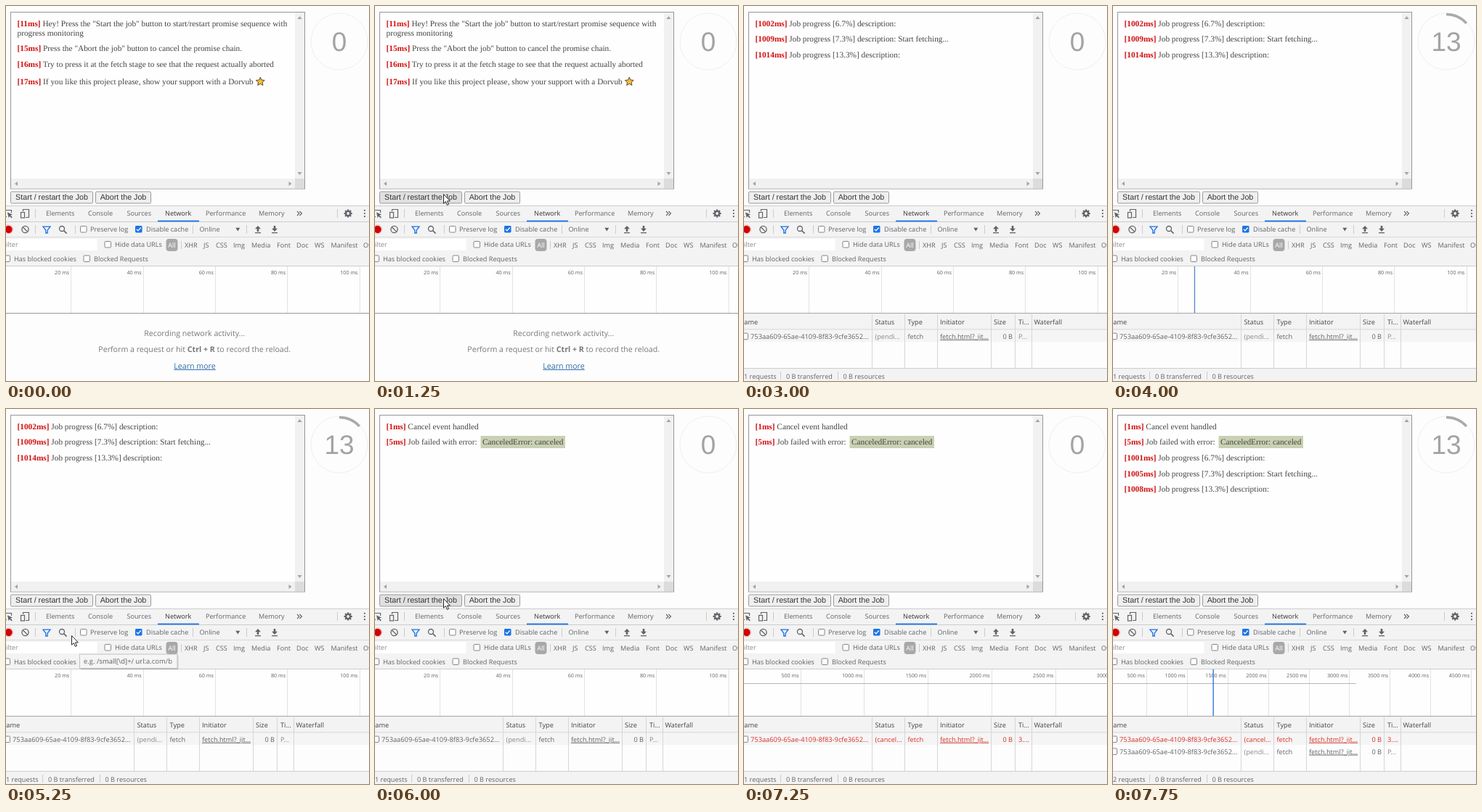
Recreate the animation shown at these times as an HTML page. Size 500 by 517 pixels, loop 8000 ms.

```html
<!DOCTYPE html>
<html lang="en">
<head>
<meta charset="utf-8">
<title>Promise job monitor</title>
<style>
  html, body { margin: 0; width: 100%; height: 100%; overflow: hidden; background: #fdfdfd; }
  svg { display: block; width: 100vw; height: 100vh; }
  text { font: 9.15px 'Open Sans', 'Noto Sans', sans-serif; fill: #5f6368; text-rendering: geometricPrecision; }
  .log text { font: 11.32px 'Liberation Serif', 'Times New Roman', serif; fill: #444; }
  .log .at { font-weight: 700; fill: #d01010; }
  .btn text { font: 10.7px 'Liberation Sans', Arial, sans-serif; fill: #333; text-anchor: middle; }
  .num { font: 37px 'Liberation Sans', Arial, sans-serif; fill: #a3a3a3; text-anchor: middle; }
  .tick { font-size: 7.2px; text-anchor: end; }
  .hint { font-size: 10.65px; fill: #777; text-anchor: middle; }
  .cell { font-size: 9.2px; }
  .tip { font-size: 9.45px; fill: #575757; }
  .end { text-anchor: end; }
</style>
</head>
<body>
<svg viewBox="0 0 500 517" preserveAspectRatio="none">
  <g id="base"></g>
  <g id="live"></g>
</svg>
<script>
const STEP = 250, LOOP = 8000;
const INK = '#5f6368', BLUE = '#1a73e8', RED = '#d93025';

const rect = (x, y, w, h, fill, extra = '') =>
  `<rect x="${x}" y="${y}" width="${w}" height="${h}" fill="${fill}" ${extra}/>`;
const path = (d, stroke, width = 1, fill = 'none') =>
  `<path d="${d}" stroke="${stroke}" stroke-width="${width}" fill="${fill}"/>`;
const shape = (d, fill) => `<path d="${d}" fill="${fill}"/>`;
const text = (x, y, s, cls = '', extra = '') =>
  `<text x="${x}" y="${y}" class="${cls}" ${extra}>${s}</text>`;
const circle = (x, y, r, stroke, width, fill = 'none') =>
  `<circle cx="${x}" cy="${y}" r="${r}" stroke="${stroke}" stroke-width="${width}" fill="${fill}"/>`;
const hline = (y, c) => rect(0, y, 500, 1, c);
const vline = (x, y, h, c = '#ccc') => rect(x, y, 1, h, c);
const box = (x, y) => rect(x + .5, y + .5, 8.5, 8.5, '#fff', 'rx="1.2" stroke="#858585"');

function logFrame() {
  return rect(6.5, 8.5, 405, 243.5, '#fefefe', 'stroke="#979797"')
    + rect(398, 9, 13, 229, '#f1f1f1') + rect(7, 238, 391, 13.5, '#f1f1f1')
    + rect(398, 238, 13, 13.5, '#dcdcdc')
    + shape('M401.5 18l3-4 3 4zM401.5 229l3 4 3-4zM16 242l-4 3 4 3zM389.5 242l4 3-4 3z', '#a3a3a3');
}

function icons() {
  const teeth = Array.from({ length: 8 }, (_, i) =>
    `<rect x="470.1" y="280.4" width="2.2" height="3" fill="${INK}" transform="rotate(${i * 45} 471.2 286)"/>`).join('');
  return path('M-2 281.5H7.5V285M-2 290.5H1', INK, 1.2)
    + shape('M2 284.5l7 3-2.8 1 2.6 2.8-1.2 1.1-2.6-2.7-1.3 2.6z', INK)
    + path('M23.5 283V280.5H31.5V291.5H27', INK, 1.2) + rect(20.5, 284.5, 5, 7.5, '#f3f3f3', `stroke="${INK}" stroke-width="1.2"`)
    + path('M401 283l3 3-3 3M404.5 283l3 3-3 3', INK, 1.1)
    + teeth + circle(471.2, 286, 3, INK, 2.2)
    + [281.8, 286, 290.2].map(y => circle(494, y, 1.1, 'none', 0, INK)).join('')
    + circle(3.5, 308, 5.2, 'none', 0, '#d40000') + circle(3.5, 308, 6.2, '#f0a0a0', .6)
    + circle(26.5, 308, 4.6, INK, 1.3) + path('M23.2 304.8l6.6 6.6', INK, 1.3)
    + path('M51 304.2h10l-3.8 4.8v4h-2.4v-4z', BLUE, 1.3)
    + circle(77, 307, 3.5, INK, 1.3) + path('M79.6 309.6l4 4', INK, 1.5)
    + shape('M316.3 305.8h6l-3 4.6z', INK)
    + shape('M347 303l4 4.2h-2.7v3.8h-2.6v-3.8H343zM370 311l-4-4.2h2.7V303h2.6v3.8h2.7z', INK)
    + rect(343, 312, 8, 1.3, INK) + rect(366, 312, 8, 1.3, INK);
}

function devtools() {
  const tabs = [[55, 'Elements'], [113, 'Console'], [166.5, 'Sources'], [275, 'Performance'], [348, 'Memory']];
  const kinds = [[246, 'XHR'], [272, 'JS'], [289, 'CSS'], [313, 'Img'], [338, 'Media'], [373, 'Font'],
    [400, 'Doc'], [425, 'WS'], [447.5, 'Manifest'], [492, 'Other']];
  return rect(0, 275, 500, 84, '#f3f3f3') + hline(275, '#cdcdcd') + hline(297, '#cdcdcd') + hline(318, '#dadada')
    + tabs.map(([x, s]) => text(x, 289.4, s)).join('')
    + text(219, 289.4, 'Network', '', 'style="fill:#333"') + rect(209, 295.6, 57, 1.8, BLUE)
    + vline(40, 280, 12) + vline(456, 280, 12)
    + [40, 95, 257, 331].map(x => vline(x, 302, 12)).join('')
    + icons()
    + box(102, 303) + text(116, 311.3, 'Preserve log')
    + rect(178, 303, 9.5, 9.5, BLUE, 'rx="1.4"') + path('M179.9 307.8l2 2.1 3.8-4.4', '#fff', 1.3)
    + text(193, 311.3, 'Disable cache') + text(266.5, 311.3, 'Online')
    + rect(0, 321, 125.5, 16, '#fff') + text(-4.7, 332.2, 'Filter', '', 'style="fill:#8a8a8a"')
    + box(135.5, 324) + text(150, 332.2, 'Hide data URLs')
    + rect(220.5, 321, 16, 17, '#a8a8a8', 'rx="4"') + text(223.2, 333, 'All', '', 'style="fill:#fff"')
    + vline(241, 324, 11)
    + kinds.map(([x, s]) => text(x, 333, s)).join('')
    + box(-3.5, 343.5) + text(11, 351.8, 'Has blocked cookies')
    + box(106.5, 343.5) + text(121, 351.8, 'Blocked Requests');
}

const LOGS = {
  intro: [
    [27.5, '11', 'Hey! Press the "Start the job" button to start/restart promise sequence with'],
    [41.3, '', 'progress monitoring'],
    [62.3, '15', 'Press the "Abort the job" button to cancel the promise chain.'],
    [84.3, '16', 'Try to press it at the fetch stage to see that the request actually aborted'],
    [107.7, '17', 'If you like this project please, show your support with a Dorvub']],
  cancel: [[27.5, '1', 'Cancel event handled'], [49.2, '5', 'Job failed with error:']]
};
const progress = (y, times) =>
  ['[6.7%] description:', '[7.3%] description: Start fetching...', '[13.3%] description:']
    .map((s, i) => [y + i * 21.7, times[i], 'Job progress ' + s]);

const line = ([y, ms, s]) =>
  text(15.5, y, (ms && `<tspan class="at">[${ms}ms]</tspan> `) + s);

function star(cx, cy) {
  const pts = Array.from({ length: 10 }, (_, i) => {
    const r = i % 2 ? 2.9 : 6.2, a = i * Math.PI / 5;
    return (cx + r * Math.sin(a)).toFixed(1) + ',' + (cy - r * Math.cos(a)).toFixed(1);
  });
  return `<polygon points="${pts.join(' ')}" fill="#f7bf3a" stroke="#4a3b20" stroke-width=".9" stroke-linejoin="round"/>`;
}

function log(n) {
  let lines = [], extra = '';
  if (n < 8) {
    lines = LOGS.intro;
    extra = star(350.3, 104.3);
  } else if (n >= 24) {
    lines = LOGS.cancel.concat(n >= 30 ? progress(70.9, [1001, 1005, 1008]) : []);
    extra = rect(145.5, 37, 116.5, 17, '#c9d1b3') + text(148, 49.2, 'CanceledError: canceled');
  } else if (n >= 12) {
    lines = progress(27.5, [1002, 1009, 1014]);
  }
  return `<g class="log">${lines.map(line).join('')}${extra}</g>`;
}

function dial(n) {
  const rise = [0, 7, 11, 13.3];
  const v = n >= 30 ? (n === 30 ? 7 : 13.3) : n >= 12 && n < 24 ? rise[Math.min(n - 12, 3)] : 0;
  const a = v / 50 * Math.PI, r = 37.5;
  const arc = v ? path(`M459 ${49 - r}A${r} ${r} 0 0 1 ${459 + r * Math.sin(a)} ${49 - r * Math.cos(a)}`, '#aaa', 3.4) : '';
  return circle(459, 49, 39, '#efefef', 1) + arc + text(459, 62.2, Math.floor(v), 'num');
}

function buttons(n) {
  const hot = n >= 5 && n <= 8 || n === 23 || n === 24;
  const one = (x, w, s, fill) =>
    rect(x + .5, 256, w, 16, fill, 'rx="1.6" stroke="#999"') + text(x + .5 + w / 2, 267.2, s);
  return `<g class="btn">${one(6, 113, 'Start / restart the Job', hot ? '#e0e0e0' : '#efefef')}`
    + `${one(123, 76, 'Abort the Job', '#efefef')}</g>`;
}

function timeline(n) {
  const [gap, unit] = n < 25 ? [99.3, 20] : n < 30 ? [87.7, 500] : [55.9, 500];
  let s = rect(0, 359, 500, 65, '#fefefe') + hline(358, '#cdcdcd');
  for (let i = 1, x; (x = i * gap - 10) < 530; i++)
    s += vline(Math.round(x), 359, 64, '#e2e2e2') + text(x - 2, 370.3, i * unit + ' ms', 'tick');
  if (n >= 25) s += rect(0, 378, n < 30 ? 500 : 335, 1, '#b5b5b5');
  if (n >= 14 && n < 18) s += rect(111.8, 359, 1.3, 64, '#5b7fd0');
  if (n >= 31) s += rect(137.4, 359, 1.5, 64, '#3f7fe0');
  return s + rect(0, 423, 500, 1.3, '#a8a8a8');
}

function row(y, canceled) {
  const color = canceled ? RED : INK;
  const c = `style="fill:${color}"`;
  const soft = canceled ? c : 'style="fill:#888"';
  return box(-3.5, y - 8.2)
    + text(9, y, '753aa609-65ae-4109-8f83-9cfe3652...', 'cell', `style="font-size:9.3px;fill:${color}"`)
    + text(180.5, y, canceled ? '(cancel...' : '(pendi...', 'cell', soft)
    + text(225.5, y, 'fetch', 'cell', c)
    + text(270, y, 'fetch.html?_ijt...', 'cell', c + ' text-decoration="underline"')
    + text(370, y, '0 B', 'cell end', c)
    + text(378, y, canceled ? '3....' : 'P...', 'cell', soft);
}

function network(n) {
  if (n < 12) return text(259.7, 454.6, 'Recording network activity...', 'hint')
    + text(259.7, 477.2, 'Perform a request or hit <tspan font-weight="700">Ctrl + R</tspan> to record the reload.', 'hint')
    + text(260, 499.8, 'Learn more', 'hint', 'style="fill:#2f6ca8" text-decoration="underline"');
  const two = n >= 30;
  const heads = [[-6.6, 'Name'], [180.5, 'Status'], [225.5, 'Type'], [270, 'Initiator'], [344, 'Size'], [378, 'Ti...'], [399.5, 'Waterfall']];
  return rect(0, 424.3, 500, 22, '#f3f3f3') + hline(445.5, '#cdcdcd')
    + rect(0, 446.5, 500, 16.5, '#f5f5f5')
    + [176, 221, 266, 340, 373, 396].map(x => vline(x, 425, 75, '#d6d6d6')).join('')
    + heads.map(([x, s]) => text(x, 438.8, s, 'cell', 'style="fill:#444"')).join('')
    + row(458.8, n >= 25) + (two ? row(475.6, false) : '')
    + rect(0, 499.5, 500, 18, '#f3f3f3') + hline(499, '#cdcdcd')
    + text(0, 513.6, (two ? 2 : 1) + ' requests') + text(58, 513.6, '0 B transferred') + text(136.5, 513.6, '0 B resources')
    + vline(50, 504, 11) + vline(129, 504, 11);
}

// Tooltips: x, y, width, label, opacity, steps shown
const TIPS = [
  [97.5, 320.5, 204, 'Do not clear log on page reload / navigation', .97, [4, 11]],
  [101.5, 338, 134.5, 'e.g. /small[\\d]+/ url:a.com/b', .9, [20, 21]],
  [139, 334, 127.5, 'Hides data: and blob: URLs', .87, [26, 27]]
];
function tooltip(n) {
  return TIPS.filter(t => t[5].includes(n)).map(([x, y, w, s, o]) =>
    `<g opacity="${o}">` + rect(x + 1.5, y + 1.5, w, 20, '#000', 'opacity=".14" rx="1"')
    + rect(x, y, w, 19.5, '#f6f6f6', 'stroke="#b0b0b0" stroke-width=".8"')
    + text(x + 5.5, y + 12.9, s, 'tip') + '</g>').join('');
}

// Pointer position from each step on; null hides it
const POINTER = [
  [0, null], [1, [186, 474]], [2, [165, 425]], [3, [141, 372]], [4, [106, 316]], [5, [94, 259]],
  [9, [96, 275]], [10, [97, 302]], [11, [106, 323.5]], [12, null],
  [20, [101, 322]], [21, [90, 312]], [22, [92, 285]], [23, [94, 261]], [25, [105, 272]],
  [26, [139, 318]], [27, [135.5, 343.5]], [28, [158, 420]], [29, null]
];
function pointer(n) {
  const at = POINTER.filter(p => p[0] <= n).pop()[1];
  return at ? `<g transform="translate(${at})">`
    + path('M.5 .5V13.2L3.4 10.6L5.4 15.4L7.5 14.5L5.5 9.9H9.4Z', '#111', .9, '#fff') + '</g>' : '';
}

document.getElementById('base').innerHTML = rect(0, 0, 500, 517, '#fdfdfd') + logFrame() + devtools();
const live = document.getElementById('live');
const parts = [log, dial, buttons, timeline, network, tooltip, pointer];
const start = performance.now();
let shown = -1;

function draw(now) {
  const n = Math.floor(Math.max(0, now - start) % LOOP / STEP);
  if (n !== shown) {
    live.innerHTML = parts.map(part => part(n)).join('');
    shown = n;
  }
  requestAnimationFrame(draw);
}
draw(start);
</script>
</body>
</html>
```
